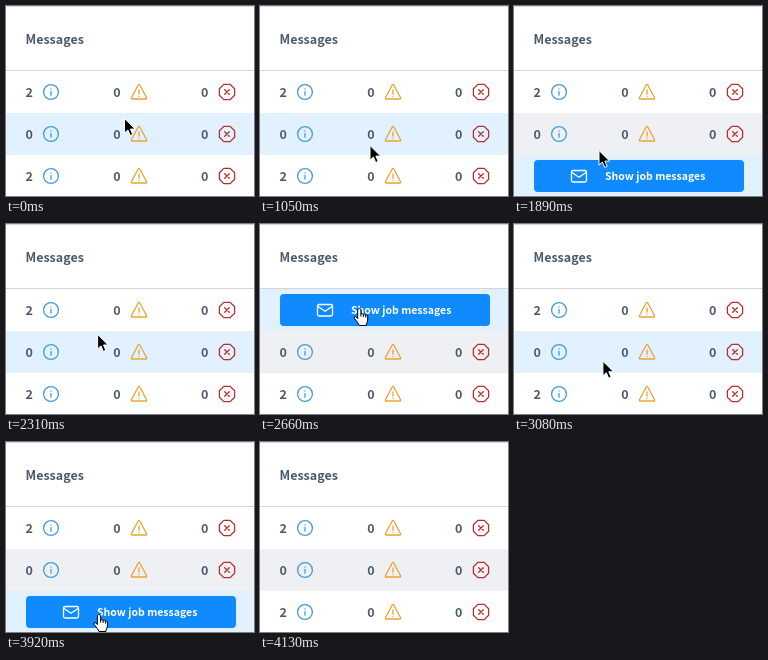
Animation of 248 by 190 pixels, one loop 4200 ms. Source, as an HTML page:

```html
<!DOCTYPE html>
<html lang="en">
<head>
<meta charset="utf-8">
<title>Messages</title>
<style>
  html, body { margin: 0; height: 100%; overflow: hidden; background: #fff; }
  svg { display: block; }
  text { font: bold 12.5px "Noto Sans CJK JP", "Noto Sans CJK SC", "Noto Sans CJK", "Open Sans", sans-serif; fill: #4a5a6c; }
  .button text { font-size: 10.5px; fill: #fff; }
  .icon { fill: none; stroke-width: 1.3; stroke-linecap: round; stroke-linejoin: round; }
</style>
</head>
<body>
<svg width="248" height="190" viewBox="0 0 248 190">
  <defs>
    <g id="info" class="icon" stroke="#429cdd">
      <circle r="7.4"/>
      <path d="M0 -.6V3.2M0 -3.2V-3"/>
    </g>
    <g id="warning" class="icon" stroke="#eba233">
      <path d="M-.8 -7Q0 -8.2 .8 -7L7.6 5.7Q8 7 6.8 7H-6.8Q-8 7 -7.6 5.7ZM0 -2V2.2M0 4.4V4.5"/>
    </g>
    <g id="error" class="icon" stroke="#b6302f">
      <path d="M-3.2 -7.6H3.2L7.6 -3.2V3.2L3.2 7.6H-3.2L-7.6 3.2V-3.2ZM-2.3 -2.3L2.3 2.3M2.3 -2.3L-2.3 2.3"/>
    </g>
  </defs>
  <text x="19.5" y="38">Messages</text>
  <path d="M0 .5H248M0 64.5H248" stroke="#d4d6d9"/>
  <g id="rows"></g>
  <g id="cursor">
    <path id="arrow" d="M0 0V14.6L3.4 11.5L5.7 17L8.2 15.9L5.9 10.6H10.6Z" stroke="#fff"/>
    <path id="hand" d="M-1.6 1.5Q0 -.9 1.6 1.5V6Q3 5 4.1 6.4Q5.5 5.7 6.4 7Q8.1 6.4 8.4 8V12Q8.4 14 7 16V17.5H0Q-1 15 -5 10.3Q-5.2 8 -3.4 8.7L-1.6 10.6ZM1.6 6V8.5M4.1 6.4V9M6.4 7V9.5" fill="#fff" stroke="#000" stroke-linejoin="round"/>
  </g>
</svg>
<script>
const LOOP = 4200, STEP = 70, HOVER_LAG = 30;
const TOP = 65, ROW = 42;
const $ = id => document.getElementById(id);

// The pointer rests between moves
const home = { x: 118.5, y: 112.5 };
const moves = [
  { start: 0, end: 420, x: 110, y: 139.5 },
  { start: 1190, end: 1610, x: 79, y: 176.5 },
  { start: 1680, end: 2100, x: 91, y: 112.5 },
  { start: 2240, end: 2660, x: 99.3, y: 84 },
  { start: 2870, end: 3150, x: 87, y: 147 },
  { start: 3360, end: 3920, x: 93, y: 172 },
  { start: 3920, end: 4060, x: 96, y: 200 },
];

function pointerAt(t) {
  let { x, y } = home;
  for (const move of moves) {
    const k = Math.min(1, Math.max(0, (t - move.start) / (move.end - move.start)));
    const ease = k * k * (3 - 2 * k);
    x += (move.x - x) * ease;
    y += (move.y - y) * ease;
  }
  return { x, y };
}

const rowAt = t => Math.floor((pointerAt(Math.max(0, t - HOVER_LAG)).y - TOP) / ROW);

const icons = ["info", "warning", "error"];
const cell = (count, i) => `
  <text x="${19.5 + 87.7 * i}" y="26">${count}</text>
  <use href="#${icons[i]}" x="${45 + 88 * i}" y="21"/>`;

const button = `
  <g class="button">
    <rect class="face" x="20" y="5" width="210" height="32" rx="4"/>
    <g class="icon" stroke="#fff">
      <rect x="57.5" y="15.5" width="15" height="11.5" rx="1.5"/>
      <path d="M58 17.5L65 22.3L72 17.5"/>
    </g>
    <text x="91" y="25">Show job messages</text>
  </g>`;

// Only rows that have messages offer the button
const rows = [2, 0, 2].map((count, i) => {
  const group = document.createElementNS("http://www.w3.org/2000/svg", "g");
  group.setAttribute("transform", `translate(0 ${TOP + ROW * i})`);
  group.innerHTML = `
    <rect class="back" width="248" height="${ROW}"/>
    <g class="counts">${[count, 0, 0].map(cell).join("")}</g>
    ${count ? button : ""}`;
  $("rows").append(group);
  const part = name => group.querySelector("." + name);
  return { back: part("back"), counts: part("counts"), button: part("button"), face: part("face") };
});

const show = (element, visible) => element.style.display = visible ? "" : "none";

function draw(now) {
  const t = Math.floor(now % LOOP / STEP) * STEP;
  const { x, y } = pointerAt(t);
  const recent = [0, 1, 2].map(k => rowAt(t - k * STEP));
  let onButton = false;

  rows.forEach((row, i) => {
    const hover = recent[0] === i;
    row.back.style.fill = hover ? "#e2f1ff" : i % 2 ? "#eff0f4" : "#fff";
    if (!row.button) return;
    show(row.counts, !hover);
    show(row.button, hover);
    // The face darkens over the first steps of a hover
    const age = recent.filter(r => r === i).length / recent.length;
    row.face.style.fill = `color-mix(in srgb, #0f8aff ${age * 100}%, #22a6ff)`;
    const dy = y - TOP - ROW * i;
    if (hover && dy > 5 && dy < 37) onButton = true;
  });

  $("cursor").setAttribute("transform", `translate(${x} ${y})`);
  show($("arrow"), !onButton);
  show($("hand"), onButton);
}

const start = performance.now();
function tick() {
  draw(performance.now() - start);
  requestAnimationFrame(tick);
}
tick();
</script>
</body>
</html>
```
